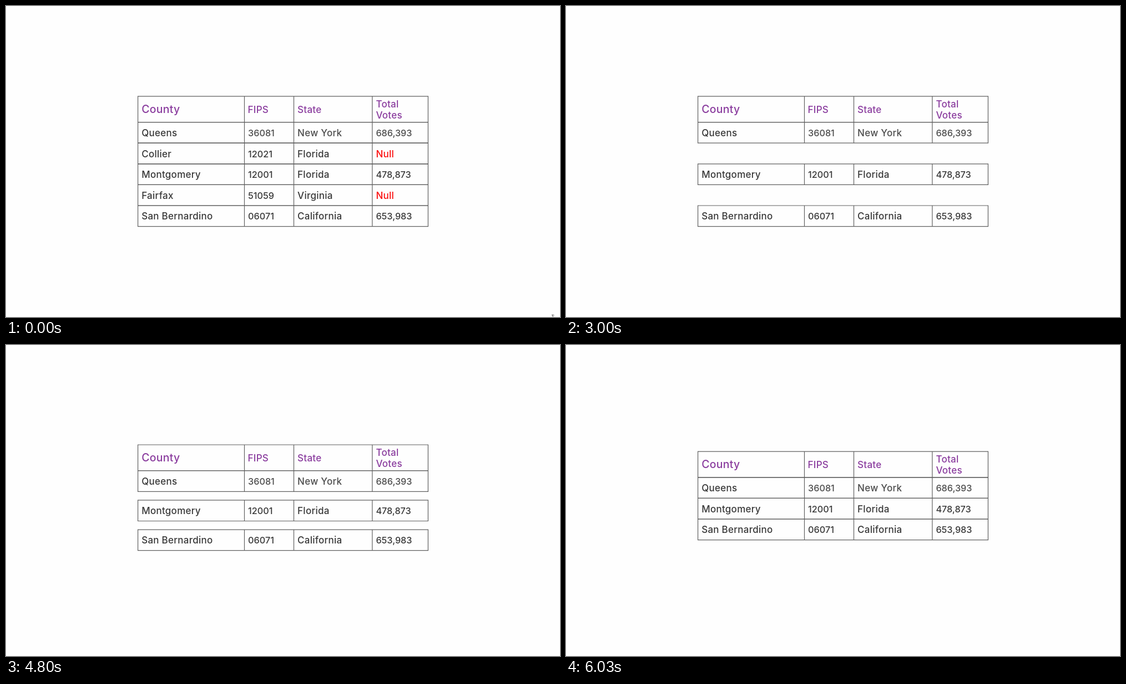
Recreate the animation shown at these times as an HTML page with a canvas. Size 998 by 561 pixels, loop 7360 ms.

```html
<!DOCTYPE html>
<html lang="en">
<head>
<meta charset="utf-8">
<title>Dropping rows with null values</title>
<style>
  html, body { margin: 0; width: 100%; height: 100%; overflow: hidden; background: #fefefe; }
  canvas { display: block; }
</style>
</head>
<body>
<canvas id="stage" width="998" height="561"></canvas>
<script>
const ctx = document.getElementById('stage').getContext('2d');

const LOOP = 7360;
const STEP = 100 / 3;
const COLS = [237.6, 429.5, 518.5, 659.8, 760.4];
const TOP = 162.9, HEAD = 46.7, ROW = 37.6, PAD = 6.6;
const INK = '#383838', SOFT = '#4c4c4c', PURPLE = '#8a3c9e', RED = '#fb0d0d', LINE = '#606060';

// shift: vertical travel while the gaps close; rows without it slide out
const ROWS = [
  { cells: ['Queens', '36081', 'New York', '686,393'], shift: 29.2, soft: true },
  { cells: ['Collier', '12021', 'Florida', 'Null'] },
  { cells: ['Montgomery', '12001', 'Florida', '478,873'], shift: -8.4 },
  { cells: ['Fairfax', '51059', 'Virginia', 'Null'] },
  { cells: ['San Bernardino', '06071', 'California', '653,983'], shift: -46 }
];

const progress = (t, from, to) => Math.min(1, Math.max(0, (t - from) / (to - from)));
const slideEase = x => x + x * (1 - x) * (1.14 * x - 0.639);
const closeEase = x => 1 - Math.pow(1 - Math.pow(x, 1.4), 2.91);

function label(text, x, y, color, size = 17, spacing = 0.25) {
  ctx.font = `500 ${size}px Inter, "Open Sans", sans-serif`;
  ctx.letterSpacing = spacing + 'px';
  ctx.fillStyle = color;
  ctx.fillText(text, x, y);
}

function grid(dx, y, height) {
  const left = COLS[0] + dx, right = COLS[4] + dx;
  ctx.strokeStyle = LINE;
  ctx.lineWidth = 1.2;
  ctx.beginPath();
  for (const c of COLS) {
    ctx.moveTo(c + dx, y);
    ctx.lineTo(c + dx, y + height);
  }
  for (const edge of [y, y + height]) {
    ctx.moveTo(left - 0.6, edge);
    ctx.lineTo(right + 0.6, edge);
  }
  ctx.stroke();
}

function header(y) {
  grid(0, y, HEAD);
  label('County', COLS[0] + PAD, y + 30.2, PURPLE, 19.5);
  label('FIPS', COLS[1] + PAD - 0.6, y + 29.6, PURPLE);
  label('State', COLS[2] + PAD, y + 29.6, PURPLE);
  label('Total', COLS[3] + PAD, y + 19.9, PURPLE);
  label('Votes', COLS[3] + PAD, y + 39.8, PURPLE);
}

function row({ cells, soft }, dx, y) {
  grid(dx, y, ROW);
  cells.forEach((text, i) => {
    const color = text === 'Null' ? RED : soft && i ? SOFT : INK;
    const numeric = /^\d/.test(text);
    label(text, COLS[i] + PAD + dx, y + 25.3, color, numeric ? 16.2 : 17, numeric ? 0 : 0.25);
  });
}

function pointerTip() {
  ctx.strokeStyle = '#555';
  ctx.lineWidth = 1;
  ctx.beginPath();
  ctx.moveTo(987.5, 557.8);
  ctx.lineTo(983.5, 557);
  ctx.lineTo(985.8, 561);
  ctx.stroke();
}

function draw(time) {
  // motion advances at 30 steps per second, on a 10 ms clock
  const clock = Math.floor(time / 10) * 10;
  const t = Math.floor((clock + 9.9) / STEP) * STEP;
  const slide = -761.5 * slideEase(progress(t, 2000 + STEP, 3000));
  const close = closeEase(progress(t, 4000 + STEP, 6000 + STEP));

  ctx.fillStyle = '#fefefe';
  ctx.fillRect(0, 0, 998, 561);
  header(TOP + ROWS[0].shift * close);
  ROWS.forEach((r, i) => {
    const y = TOP + HEAD + ROW * i;
    if (r.shift) row(r, 0, y + r.shift * close);
    else if (clock < 3000) row(r, slide, y);
  });
  if (clock < 1500) pointerTip();
}

const start = performance.now();
function tick() {
  draw((performance.now() - start) % LOOP);
  requestAnimationFrame(tick);
}
tick();
</script>
</body>
</html>
```
